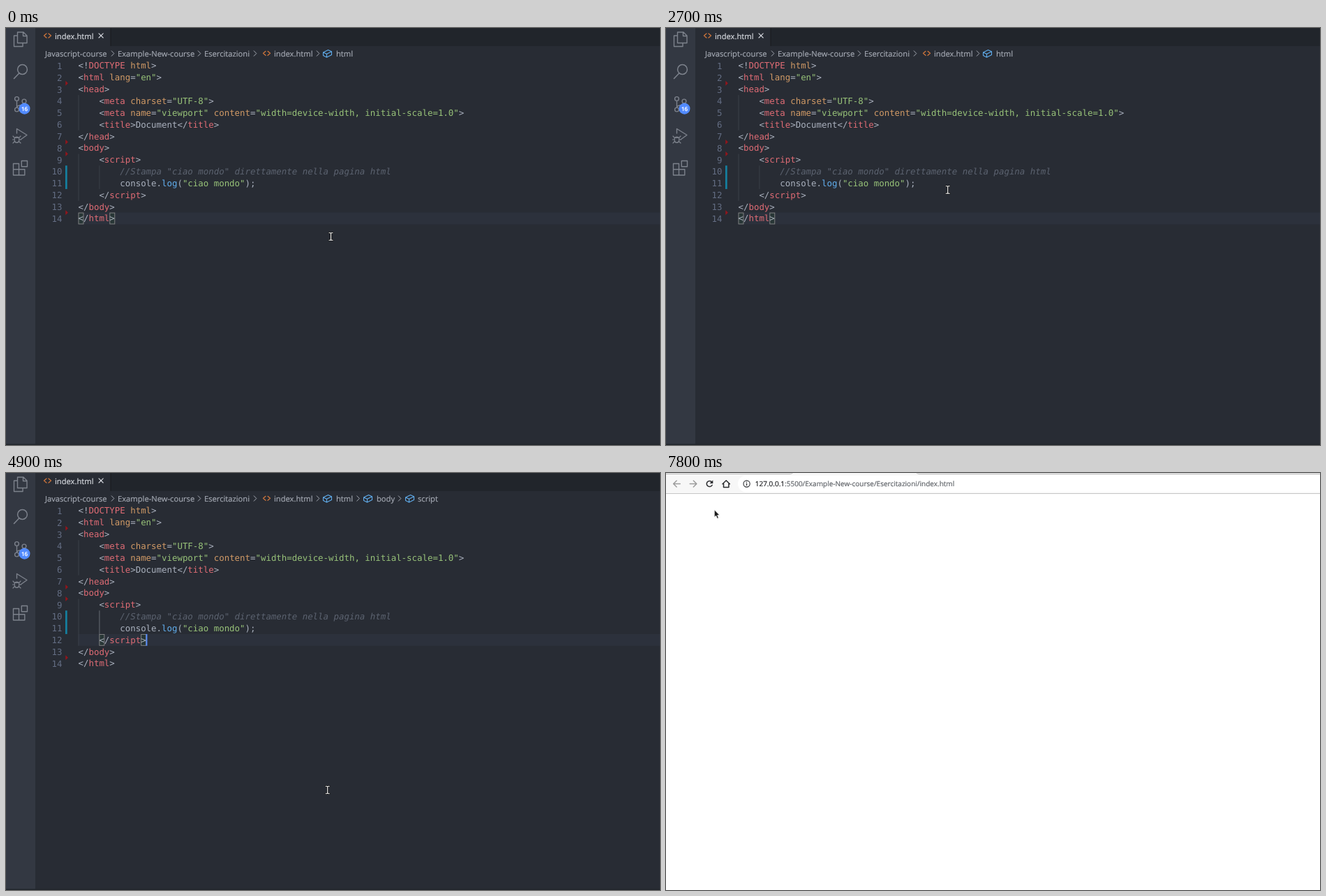
An HTML page for the animation above (8000 ms loop, 937x598 px).

```html
<!DOCTYPE html>
<html lang="en">
<head>
<meta charset="UTF-8">
<title>Editor and browser</title>
<style>
html, body { margin: 0; width: 100%; height: 100%; overflow: hidden; background: #282c34; }
svg { display: block; width: 100%; height: 100%; }
text { white-space: pre; text-rendering: geometricPrecision; font-family: "Open Sans", "Noto Sans", sans-serif; }
.code { font-family: "DejaVu Sans Mono", "Noto Sans Mono", monospace; font-size: 12.41px; }
.keys { text-anchor: end; word-spacing: -.6px; }
.line { fill: none; stroke-linecap: round; stroke-linejoin: round; }
</style>
</head>
<body>
<svg id="stage" viewBox="0 0 937 598"></svg>
<script>
const NS = "http://www.w3.org/2000/svg";
const stage = document.getElementById("stage");

function el(parent, tag, attrs = {}, text) {
  const node = document.createElementNS(NS, tag);
  for (const k in attrs) node.setAttribute(k, attrs[k]);
  if (text !== undefined) node.textContent = text;
  return parent.appendChild(node);
}
const group = (p, a) => el(p, "g", a);
const rect = (p, x, y, width, height, fill, more) => el(p, "rect", { x, y, width, height, fill, ...more });
// A hairline stroke gives the interface text its sturdier weight
const label = (p, x, y, size, fill, text, more) =>
  el(p, "text", { x, y, "font-size": size, fill, stroke: fill, "stroke-width": .2, ...more }, text);
const line = (p, d, stroke, width = 1, more) =>
  el(p, "path", { d, stroke, "stroke-width": width, class: "line", ...more });
const show = (node, on) => node.setAttribute("visibility", on ? "visible" : "hidden");

// Editor
const CHAR = 7.47, ROW = 16.85, LEFT = 103.5, TOP = 45.6;
const rowY = n => TOP + (n - 1) * ROW;
const COLORS = { g: "#abb2bf", r: "#e06c75", o: "#d19a66", s: "#98c379", b: "#61afef", c: "#5c6370" };
const CODE = [
  "g<!|rDOCTYPE|o html|g>",
  "g<|rhtml|o lang|g=|s\"en\"|g>",
  "g<|rhead|g>",
  "g    <|rmeta|o charset|g=|s\"UTF-8\"|g>",
  "g    <|rmeta|o name|g=|s\"viewport\"|o content|g=|s\"width=device-width, initial-scale=1.0\"|g>",
  "g    <|rtitle|g>Document</|rtitle|g>",
  "g</|rhead|g>",
  "g<|rbody|g>",
  "g    <|rscript|g>",
  "c        //Stampa \"ciao mondo\" direttamente nella pagina html",
  "g        console.|blog|g(|s\"ciao mondo\"|g);",
  "g    </|rscript|g>",
  "g</|rbody|g>",
  "g</|rhtml|g>"
];

const editor = group(stage);
rect(editor, 0, 0, 937, 598, "#282c34");
rect(editor, 150, 0, 787, 26, "#21252b");
rect(editor, 149.5, 0, 1, 26, "#181a1f");
rect(editor, 0, 0, 42, 598, "#333842");
rect(editor, 0, 596.5, 937, 1.5, "#21252b");

const ICON = "#7d828c";
const icons = group(editor);
line(icons, "M16.5 6H25L30 11V21.5H16.5ZM24.5 6V11.5H30M16.5 11H11.5V26.5H24V21.5", ICON, 1.4);
line(icons, "M11.5 72.5L18.7 65", ICON, 1.6);
el(icons, "circle", { cx: 23.5, cy: 59.5, r: 6.9, stroke: ICON, "stroke-width": 1.5, fill: "none" });
for (const [cx, cy] of [[15.5, 101.5], [26, 105], [15.5, 117]])
  el(icons, "circle", { cx, cy, r: 2.9, stroke: ICON, "stroke-width": 1.4, fill: "none" });
line(icons, "M15.5 104.5V114M26 108C26 112 15.5 109.5 15.5 114", ICON, 1.4);
el(icons, "circle", { cx: 26.5, cy: 115.7, r: 8, fill: "#528bff" });
label(icons, 26.5, 118.7, 8, "#fff", "16", { "text-anchor": "middle", "font-weight": 600 });
line(icons, "M15.5 151V144.5L30 153.5L21 160", ICON, 1.4);
line(icons, "M12.3 158A3.6 3.6 0 0 1 18.7 158V161.5A3.3 3.8 0 0 1 12.3 161.5ZM12.3 157.5H18.7M10 155L12.3 157.5M21 155L18.7 157.5M9.5 160H12.3M18.7 160H21.5M10 165L12.5 162.5M21 165L18.5 162.5", ICON, 1.2);
line(icons, "M10.5 194.5H18.5V202.8H26.8V211H10.5ZM10.5 202.8H18.5V211M22.3 190.5H30.5V198.7H22.3Z", ICON, 1.4);

const angle = (x, y) => line(editor, `M${x + 3.5} ${y - 3}L${x} ${y}L${x + 3.5} ${y + 3}M${x + 6.5} ${y - 3}L${x + 10} ${y}L${x + 6.5} ${y + 3}`, "#d5783c", 1.2);
angle(54.5, 11);
label(editor, 70, 15.6, 11.2, "#d7dae0", "index.html");
line(editor, "M133 7.8L139.2 14M139.2 7.8L133 14", "#d7dae0", 1.1);

const CRUMB = "#a3a8b2";
const crumb = (p, x, text) => label(p, x, 40.6, 11.2, CRUMB, text);
const chevron = (p, x) => line(p, `M${x - 1.8} 32.8L${x + 1.8} 36.5L${x - 1.8} 40.2`, CRUMB, 1);
function cube(p, x) {
  line(p, `M${x - 6} 35L${x + 1} 31.5L${x + 6} 33.7V38.5L${x - 1} 42L${x - 6} 39.5ZM${x - 6} 35L${x - 1} 37.3L${x + 6} 33.7M${x - 1} 37.3V42`, "#61afef", 1.1);
}
crumb(editor, 56, "Javascript-course");
crumb(editor, 160, "Example-New-course");
crumb(editor, 284, "Esercitazioni");
crumb(editor, 384, "index.html");
crumb(editor, 473, "html");
[153, 277, 357, 447].forEach(x => chevron(editor, x));
angle(368.5, 36.3);
cube(editor, 460.5);

const path = group(editor);
[504.5, 564].forEach(x => chevron(path, x));
[518.5, 578.5].forEach(x => cube(path, x));
crumb(path, 531, "body");
crumb(path, 590, "script");

const activeRow = rect(editor, LEFT, 0, 937 - LEFT, ROW, "#2c313c");
rect(editor, 103.5, rowY(4), 1, ROW * 3, "#3b4048");
rect(editor, 103.5, rowY(9), 1, ROW * 4, "#3b4048");
const guide = rect(editor, 133.4, rowY(10), 1, ROW * 2, "#3b4048");
rect(editor, 85, rowY(10), 2.7, ROW * 2, "#147f9f");
for (const n of [3, 8, 9, 14])
  el(editor, "path", { d: `M85.3 ${rowY(n) - 3.5}l3.6 3.5l-3.6 3.5Z`, fill: "#94151b" });

function bracketBoxes(n, cols) {
  const g = group(editor);
  for (const c of cols)
    rect(g, LEFT + c * CHAR + .5, rowY(n) + .5, CHAR - .5, ROW - 1, "#006400", { "fill-opacity": .1, stroke: "#888", "stroke-width": .9 });
  return g;
}
const htmlBoxes = bracketBoxes(14, [0, 6]);
const scriptBoxes = bracketBoxes(12, [4, 12]);

CODE.forEach((src, i) => {
  const y = rowY(i + 1) + 12.8;
  el(editor, "text", { class: "code", x: 80.5, y: y + .4, fill: "#636d83", "text-anchor": "end" }, i + 1);
  const row = el(editor, "text", { class: "code", y });
  let col = 0;
  for (const part of src.split("|")) {
    const body = part.slice(1), lead = body.length - body.trimStart().length;
    const span = el(row, "tspan", { x: LEFT + (col + lead) * CHAR, fill: COLORS[part[0]] }, body.trimStart());
    if (part[0] === "c") span.setAttribute("font-style", "italic");
    col += body.length;
  }
});
const caret = rect(editor, LEFT + 13 * CHAR, rowY(12), 1.8, ROW, "#528bff");

// Context menu
const ITEMS = [
  [243, "Go to Definition", "F12"],
  [261.5, "Go to References", "Maiusc + F12"],
  [280, "Peek", ""],
  [306.7, "Find All References", "Alt + Maiusc + F12"],
  [333, "Rename Symbol", "F2"],
  [351.5, "Change All Occurrences", "Ctrl + F2"],
  [370, "Format Document", "Ctrl + Maiusc + I"],
  [396.5, "Cut", "Ctrl + X"],
  [415, "Copy", "Ctrl + C"],
  [433.5, "Paste", "Ctrl + V"],
  [460, "Open with Live Server [Alt+L Alt+O]", ""],
  [478.5, "Stop Live Server [Alt+L Alt+C]", ""],
  [505, "Command Palette...", "Ctrl + Maiusc + P"]
];
const menu = group(stage);
rect(menu, 403.5, 231.5, 306, 285, "#fafafa", { stroke: "#adadad" });
const hover = rect(menu, 404, 0, 305, 18.4, "#dcdcdc");
for (const y of [293, 319.5, 383, 446.5, 491.5]) rect(menu, 404, y, 305, 1, "#dedede");
for (const [y, name, keys] of ITEMS) {
  label(menu, 422, y + 3.9, 10.85, "#3d3d3d", name);
  label(menu, 692.5, y + 3.9, 10.85, "#3d3d3d", keys, { class: "keys" });
}
el(menu, "path", { d: "M700.2 277l3.8 3l-3.8 3Z", fill: "#555" });

// Browser
const browser = group(stage);
const DARK = "#2b2c2f", PALE = "#9b9b9b";
rect(browser, 0, 0, 937, 598, "#fff");
rect(browser, 0, 0, 937, 29, "#f7f7f7");
rect(browser, 0, 29, 937, 1, "#c6c6c6");
rect(browser, 103, 3.5, 860, 24, "#fff", { rx: 12 });
const closedStrip = group(browser);
rect(closedStrip, 0, 0, 937, 1, "#ececec");
rect(closedStrip, 0, 1, 937, 1, "#bdbdbd");
rect(closedStrip, 181, 0, 1, 1, "#aaa");
const openStrip = group(browser);
rect(openStrip, 0, 0, 180, 1, "#ececec");
rect(openStrip, 361, 0, 576, 1, "#ececec");
line(openStrip, "M0 1.5H177Q180 1.5 181.5 0M359 0Q360.5 1.5 363 1.5H937", "#bdbdbd");
line(browser, "M20.3 15.5H10.7M15.2 10.9L10.6 15.5L15.2 20.1", PALE, 1.4);
line(browser, "M34.2 15.5H43.8M39.3 10.9L43.9 15.5L39.3 20.1", PALE, 1.4);
const stop = line(browser, "M58.6 11.6L66.4 19.4M66.4 11.6L58.6 19.4", DARK, 1.6);
const reload = group(browser);
line(reload, "M66.1 17.2A4.1 4.1 0 1 1 65.3 12.6", DARK, 1.5);
el(reload, "path", { d: "M67.3 10.3V15H62.6Z", fill: DARK });
line(browser, "M81 15.7L86.2 10.7L91.4 15.7M82.5 15V20.4H89.9V15", DARK, 1.5);
el(browser, "circle", { cx: 115.6, cy: 15.5, r: 4.6, fill: "none", stroke: DARK, "stroke-width": 1.1 });
line(browser, "M115.6 15.2V17.6M115.6 13.2V13.3", DARK, 1.2);
const url = label(browser, 127.7, 19.2, 10.03, "#202124", "");
el(url, "tspan", {}, "127.0.0.1");
el(url, "tspan", { fill: "#5f6368", stroke: "#5f6368" }, ":5500/Example-New-course/Esercitazioni/index.html");

// Pointers
const beam = group(stage);
const BEAM = "M-2.6 -5.2H-1Q0 -5.2 0 -4V4Q0 5.2 -1 5.2H-2.6M2.6 -5.2H1Q0 -5.2 0 -4M0 4Q0 5.2 1 5.2H2.6";
line(beam, BEAM, "#111", 2.6);
line(beam, BEAM, "#fff", 1.1);
const arrow = group(stage);
el(arrow, "path", { d: "M.3 .3V10.8L2.7 8.7L4.4 12.8L6.3 12L4.6 8H7.8Z", fill: "#1a1a1a", stroke: "#fff", "stroke-width": .7 });

// Waypoints: tick of 100 ms, x, y
const ROUTE = [
  [2, 465.5, 299], [4, 440, 291], [8, 222, 229], [11, 163.5, 215],
  [12, 163.5, 215], [14, 196, 214], [16, 243, 213.5], [17, 272, 212], [20, 349, 224], [21, 357, 220],
  [24, 400, 229], [26, 400, 229], [27, 403.7, 232],
  [38, 403.7, 232], [39, 409, 244], [41, 432, 310], [43, 455, 410], [45, 460.7, 454.5],
  [59, 460.7, 454.5], [61, 440, 425], [64, 335, 270], [66, 292, 222], [67, 293, 226],
  [74, 293, 226], [75, 255, 197], [77, 105, 80], [78, 69, 52.5]
];
function pointerAt(tick) {
  const i = ROUTE.findIndex(p => p[0] >= tick);
  if (i === 0) return ROUTE[0].slice(1);
  if (i < 0) return ROUTE[ROUTE.length - 1].slice(1);
  const [t0, x0, y0] = ROUTE[i - 1], [t1, x1, y1] = ROUTE[i];
  const k = (tick - t0) / (t1 - t0);
  return [x0 + (x1 - x0) * k, y0 + (y1 - y0) * k];
}

function draw(t) {
  const tick = Math.floor(t / 100);
  const [x, y] = pointerAt(tick);
  const clicked = tick >= 35, inMenu = tick >= 39 && tick < 49, web = tick >= 53;

  show(editor, !web);
  show(menu, clicked && tick < 49);
  show(browser, web);
  activeRow.setAttribute("y", rowY(clicked ? 12 : 14));
  guide.setAttribute("fill", clicked ? "#666b73" : "#3b4048");
  show(htmlBoxes, tick < 36);
  show(scriptBoxes, tick >= 36 && !web);
  show(path, tick >= 37 && !web);
  show(caret, clicked && !web && !(tick >= 40 && tick < 45));

  const item = inMenu && ITEMS.find(([cy]) => Math.abs(cy - y) < 9.25);
  show(hover, item);
  if (item) hover.setAttribute("y", item[0] - 9.2);

  show(closedStrip, tick === 53);
  show(openStrip, tick >= 54);
  show(stop, web && tick < 55);
  show(reload, tick >= 55);

  show(arrow, inMenu || web);
  show(beam, !inMenu && !web);
  for (const p of [arrow, beam]) p.setAttribute("transform", `translate(${x} ${y})`);
}

const start = performance.now();
function loop() {
  draw((performance.now() - start) % 8000);
  requestAnimationFrame(loop);
}
loop();
</script>
</body>
</html>
```
